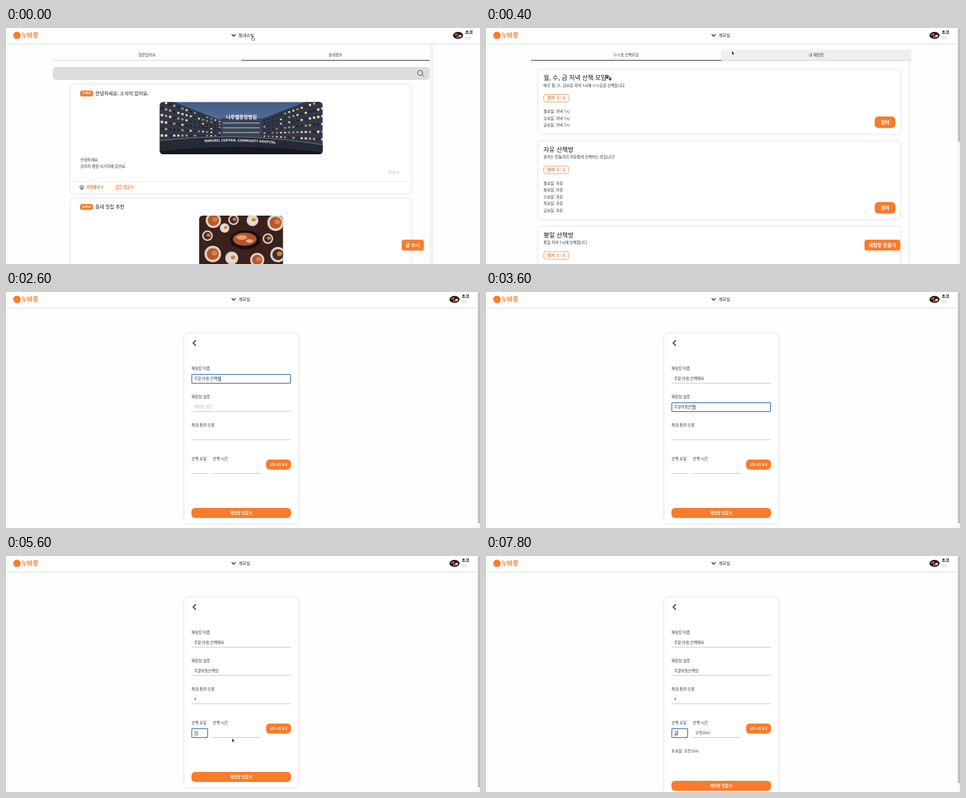
Animation, 800 px wide and 400 px high, one loop 8 s. Source, as an HTML page:

```html
<!DOCTYPE html>
<html lang="ko">
<head>
<meta charset="utf-8">
<style>
html, body { margin: 0; width: 100%; height: 100%; overflow: hidden; background: #fefefe; }
svg { display: block; width: 100vw; height: 100vh; }
text { font-family: "Noto Sans CJK KR", "Noto Sans CJK", "Noto Sans", sans-serif; fill: #333; white-space: pre; }
.m { font-weight: 500; fill: #111; }
.b { font-weight: 700; fill: #111; }
.w { font-weight: 700; fill: #fff; }
.o { font-weight: 700; fill: #f97b2c; }
.g { fill: #aaa; }
.card { fill: #fff; filter: drop-shadow(0 0 2px rgba(0, 0, 0, .16)); }
.bar { fill: #fff; filter: drop-shadow(0 1px 2px rgba(0, 0, 0, .12)); }
.line { fill: none; stroke: #111; stroke-linecap: round; stroke-linejoin: round; }
</style>
</head>
<body>
<svg id="stage" viewBox="0 0 800 400" preserveAspectRatio="none"></svg>
<script>
const ORANGE = '#f97b2c';
const stage = document.getElementById('stage');

// Text is placed by the vertical centre of its line.
const text = (x, cy, size, string, cls = '', anchor = 'start', extra = '') =>
  `<text x="${x}" y="${cy + size * .37}" font-size="${size}" class="${cls}" text-anchor="${anchor}" ${extra}>${string}</text>`;
const mid = (x, cy, size, string, cls) => text(x, cy, size, string, cls, 'middle');
const rect = (x, y, w, h, fill, r = 0, extra = '') =>
  `<rect x="${x}" y="${y}" width="${w}" height="${h}" rx="${r}" fill="${fill}" ${extra}/>`;
const card = (x, y, w, h, id = '') => rect(x, y, w, h, '#fff', 6, `class="card" ${id}`);
const ellipse = (x, y, rx, ry, fill) => `<ellipse cx="${x}" cy="${y}" rx="${rx}" ry="${ry}" fill="${fill}"/>`;
const line = (d, width = 1, color = '#111') =>
  `<path class="line" d="${d}" style="stroke:${color};stroke-width:${width}"/>`;
const button = (x, y, w, h, size, label, r = 5) =>
  rect(x, y, w, h, ORANGE, r) + mid(x + w / 2, y + h / 2, size, label, 'w');
const paw = (x, y, scale, fill) =>
  `<g transform="translate(${x} ${y}) scale(${scale})">` +
  ellipse(0, 2, 2.8, 2.4, fill) + ellipse(-3.5, -.6, 1, 1.5, fill) + ellipse(-1.3, -2.7, 1.1, 1.6, fill) +
  ellipse(1.3, -2.7, 1.1, 1.6, fill) + ellipse(3.5, -.6, 1, 1.5, fill) + '</g>';

function randomFrom(seed) {
  return () => (seed = seed * 16807 % 2147483647) / 2147483647;
}

function header(title, dx) {
  const x = 763 + dx;
  return rect(0, -4, 800, 30, '#fff', 0, 'class="bar"') +
    ellipse(18.5, 12.5, 6.3, 6.3, ORANGE) + text(26, 12.5, 10.3, '누비몽', 'o') +
    line('M381.3 11 L384.2 14 L387.1 11', 1.2) + text(392.5, 12.5, 7, title, 'm') +
    ellipse(x, 12.5, 8.5, 6, '#211b1d') + ellipse(x - 3, 11, 3, 2, '#b95529') +
    ellipse(x + 3.5, 13.5, 2.6, 2, '#d9cec5') + ellipse(x, 15.5, 3, 1.4, '#c6622f') +
    text(x + 12, 7.8, 7, '초코', 'b') + text(x + 12, 17, 5, '안녕', 'g');
}

function wing(x0, x1, top0, top1, bottom0, bottom1, seed) {
  const random = randomFrom(seed);
  let out = `<path fill="#303747" d="M${x0} ${top0} L${x1} ${top1} V${bottom1} L${x0} ${bottom0}Z"/>`;
  for (let col = 0; col < 15; col++) {
    for (let row = 0; row < 6; row++) {
      const u = (col + .3) / 15, v = (row + .5) / 6.5;
      const top = top0 + (top1 - top0) * u, bottom = bottom0 + (bottom1 - bottom0) * u;
      const lit = random();
      const fill = lit > .72 ? '#f3d9a3' : lit > .45 ? '#b7946a' : '#1d2331';
      out += rect(x0 + (x1 - x0) * u, top + (bottom - top) * v, 4.2 - 1.8 * u, 4 - 2 * u, fill);
    }
  }
  return out;
}

function hospital() {
  return '<g clip-path="url(#clipA)">' + rect(259, 125, 276, 90, 'url(#sky)') +
    wing(259, 364, 116, 157, 192, 186, 17) + wing(534, 430, 114, 155, 200, 187, 91) +
    rect(362, 153, 70, 34, '#39435a') +
    [0, 1, 2].map(i => rect(366, 160 + i * 8, 62, 2.2, '#8b8c8e')).join('') +
    '<path fill="#252a35" d="M259 191 Q397 175 535 198 V215 H259Z"/>' +
    '<path fill="none" stroke="#777d88" stroke-width="1" d="M259 191 Q397 175 535 198"/>' +
    '<path id="arc" fill="none" d="M335 193.5 Q398 190 462 197"/>' +
    '<path fill="#151922" d="M259 209 Q397 193 535 211 V215 H259Z"/>' +
    mid(397.5, 151.5, 8, '나루벨중앙병원', 'w') +
    '<text class="w" font-size="5.7"><textPath href="#arc">NARUBEL CENTRAL COMMUNITY HOSPITAL</textPath></text></g>';
}

function food() {
  const plates = [[350, 326, 13], [384, 325, 9], [416, 326, 10], [455, 330, 14], [340, 352, 9],
    [369, 339, 8], [349, 383, 14], [442, 357, 9], [381, 390, 11], [424, 393, 12], [459, 384, 13]];
  return '<g clip-path="url(#clipB)">' + rect(326, 318, 142, 90, '#3b201b') +
    plates.map(([x, y, r], i) => ellipse(x, y, r, r, '#d9d0c8') +
      ellipse(x, y, r * .72, r * .72, ['#b6592d', '#463029', '#e6ddd3'][i % 3]) +
      ellipse(x + r * .2, y - r * .1, r * .35, r * .3, '#d98045')).join('') +
    ellipse(404, 359, 26, 16, '#17110f') + ellipse(403, 358, 20, 11, '#b4562a') +
    ellipse(398, 355, 9, 4, '#e4a067') + ellipse(411, 361, 6, 3, '#e2b48c') + '</g>';
}

const postHead = (cy, title) =>
  rect(125, cy - 5, 22, 10, ORANGE, 3.5) + mid(136, cy, 4, '동네정보', 'w') + text(151, cy, 8, title, 'm');

function news() {
  return rect(715, 26, 6, 374, '#f3f3f3') +
    mid(238, 46, 6.3, '질문있어요') + mid(556, 46, 6.3, '동네정보') +
    rect(79, 54.7, 318, .7, '#bbb') + rect(397, 54.3, 318, 1.2, '#333') +
    rect(79, 66, 636, 22, '#dcdcdc', 6) +
    '<circle cx="699" cy="76" r="4.2" fill="none" stroke="#444"/>' + line('M702 79 L705.3 82.3', 1, '#444') +
    card(109.5, 96.5, 574, 184) + postHead(111, '안녕하세요. 소식이 있어요.') + hospital() +
    text(125.5, 224, 6.4, '안녕하세요.') + text(125.5, 234.7, 6.4, '강아지 병원 사거리에 있어요.') +
    text(664, 245, 6, '15초 전', 'g', 'end') + rect(110, 259.6, 573, .8, '#e6e6e6') +
    paw(128, 270.2, .95, '#888') + text(135.5, 270, 6.3, '추천해요 0', 'o') +
    line('M187 266.5 H194.8 V272.5 H189.2 L187 274.5Z', .9, ORANGE) +
    line('M189.2 268.6 H192.6 M189.2 270.4 H191.8', .6, ORANGE) + text(198, 270, 6.3, '댓글 0', 'o') +
    card(109.5, 289.5, 574, 130) + postHead(303.3, '동네 맛집 추천') + food() +
    rect(668, 359, 37, 18, ORANGE, 4, 'style="filter:drop-shadow(0 0 1.5px #f97b2c88)"') +
    mid(686.5, 368, 8, '글 쓰기', 'w') + header('동네소식', 0);
}

function menu() {
  return rect(0, 26, 800, 374, '#000', 0, 'opacity=".4"') +
    '<path fill="#fff" d="M371 25 H429 V98 Q429 103 424 103 H376 Q371 103 371 98Z"/>' +
    rect(375, 32, 50, 14, '#e2e2e2', 4) + rect(375, 48.3, 50, 14, ORANGE, 4) +
    mid(400, 39, 6.4, '개모임', 'm') + mid(400, 55.3, 6.4, '동네소식', 'w') +
    mid(400, 71, 6.4, '멍그램', 'm') + mid(400, 87, 6.4, '프로필', 'm');
}

function room(y, h, title, about, days) {
  return card(88.5, y, 610.5, h) + text(97, y + 14, 10.4, title, 'm') + text(97, y + 26.7, 6.4, about) +
    rect(97.4, y + 42, 42.4, 13, '#fff', 4, `stroke="${ORANGE}" stroke-width=".8"`) +
    mid(118.6, y + 48.5, 6.6, '참여: 0 / 0', 'o') +
    days.map((day, i) => text(97, y + 71.3 + i * 11.5, 6.4, day)).join('') +
    button(656, y + h - 29, 35, 19.5, 8, '참여', 6);
}

function rooms() {
  const free = ['월', '화', '수', '목', '금'].map(day => day + '요일: 자유');
  const evening = ['월', '수', '금'].map(day => day + '요일: 저녁 7시');
  return rect(711.5, 57, 6, 343, '#f5f5f5') + rect(397, 37, 321, 18, '#efefef') +
    mid(236.5, 46, 6.3, 'ㅁㅁ동 산책모임') + mid(557.5, 46, 6.3, '내 채팅방') +
    rect(76, 54.2, 321, 1.2, '#333') + rect(397, 54.7, 321, .7, '#bbb') +
    room(70.5, 108.5, '월, 수, 금 저녁 산책 모임', '매주 월, 수, 금요일 저녁 7시에 ㅁㅁ공원 산책합니다', evening) +
    paw(204.5, 82.5, .75, '#222') + paw(209.5, 86, .65, '#222') +
    room(192, 132, '자유 산책방', '원하는 분들끼리 자유롭게 산책하는 방입니다!', free) +
    room(337, 132, '평일 산책방', '평일 저녁 7시에 산책합니다', []) +
    rect(639, 359, 60, 18, ORANGE, 4, 'style="filter:drop-shadow(0 0 1.5px #f97b2c88)"') +
    mid(669, 368, 8, '채팅방 만들기', 'w') + header('개모임', -6) +
    rect(795, 0, 5, 400, '#f7f7f7') + rect(796.5, 0, 3.5, 193, '#bebebe', 1.5);
}

// Each field: left, top, width, placeholder, then [time, value] pairs.
const fields = {
  name: { x: 313, y: 139, w: 168, hint: '20자 이하', values: [[0, ''], [1600, 'ㅈ'], [1800, '주말'],
    [2000, '주말 아'], [2200, '주말 아침'], [2400, '주말 아침 산'], [2600, '주말 아침 산책해'], [2800, '주말 아침 산책해요']] },
  desc: { x: 313, y: 187, w: 168, hint: '채팅방 설명', values: [[0, ''], [3000, '주'], [3200, '주말아'],
    [3400, '주말아침사'], [3600, '주말아침산책'], [3800, '주말아침산책바'], [4000, '주말아침산책방']] },
  max: { x: 313, y: 235, w: 168, hint: '', values: [[0, ''], [4600, '4']] },
  day: { x: 313, y: 292, w: 28, hint: '', values: [[0, ''], [5200, 'ㅌ'], [5400, '토'], [7800, '일']] },
  time: { x: 349, y: 292, w: 81.5, hint: '', values: [[0, ''], [6400, '오'], [6600, '오전'],
    [6800, '오전10'], [7000, '오전10시']] }
};
const focusTimes = [[0, ''], [1400, 'name'], [3000, 'desc'], [4200, 'max'], [5000, 'day'], [6000, 'time'], [7400, ''], [7600, 'day']];
const sceneTimes = [[0, 'news'], [200, 'menu'], [400, 'rooms'], [1200, 'form']];
const cursorTimes = [[0, 'hand', 413.5, 13], [200, 'hand', 413.5, 39], [400, 'arrow', 415, 39],
  [600, 'arrow', 520, 170], [800, 'arrow', 640, 332], [1000, 'hand', 668, 366], [1200, 'arrow', 520, 270],
  [1400, 'beam', 347.5, 153], [1600, ''], [5600, 'arrow', 381.5, 309], [5800, 'arrow', 379, 306],
  [6000, 'beam', 375, 300], [6400, ''], [7200, 'hand', 455, 291], [7600, 'beam', 331, 300], [7800, '']];

function form() {
  const inputs = Object.entries(fields).map(([id, f]) =>
    rect(f.x, f.y + 15.1, f.w, .8, '#b5b5b5') +
    rect(f.x + .6, f.y + .6, f.w - 1.2, 15, '#fff', 1.2, `id="ring-${id}" stroke="#2d6cab" stroke-width="1.2"`) +
    text(f.x + 4.5, f.y + 8, 6.4, '', '', 'start', `id="text-${id}"`)).join('');
  return card(301, 70, 192, 322, 'id="panel"') + line('M320 82.3 L315.8 86.5 L320 90.7', 1.5) +
    text(313, 129.8, 6.4, '채팅방 이름') + text(313, 177.8, 6.4, '채팅방 설명') +
    text(313, 225.8, 6.4, '최대 참여 인원') + text(313, 282.8, 6.4, '산책 요일') + text(349, 282.8, 6.4, '산책 시간') +
    inputs + rect(0, 0, .6, 8, '#222', 0, 'id="caret"') + rect(0, 0, 5.9, .6, '#222', 0, 'id="compose"') +
    button(439, 284, 42, 17, 4.8, '산책 시간 추가', 6) +
    `<g id="added">${text(313, 330.5, 6.4, '토요일: 오전10시')}</g>` +
    `<g id="submit">${button(313, 366, 168, 17, 6.4, '채팅방 만들기', 6)}</g>` + header('개모임', -6) +
    rect(795, 0, 5, 400, '#f7f7f7') + rect(796.5, 0, 3.5, 392, '#bebebe', 1.5, 'id="thumb"');
}

const group = (id, content) => `<g id="${id}">${content}</g>`;
stage.innerHTML = `<defs>
  <linearGradient id="sky" x2="0" y2="1"><stop stop-color="#445d87"/><stop offset=".5" stop-color="#5c749b"/><stop offset="1" stop-color="#28303f"/></linearGradient>
  <clipPath id="clipA">${rect(259.5, 125.5, 275, 88.5, '#000', 6)}</clipPath>
  <clipPath id="clipB">${rect(326, 318, 141.5, 100, '#000', 6)}</clipPath></defs>` +
  rect(0, 0, 800, 400, '#fefefe') +
  group('news', news()) + group('menu', menu()) + group('rooms', rooms()) + group('form', form()) +
  group('arrow', '<path d="M0 0V6.3L1.5 5 2.5 7.3 3.5 6.9 2.6 4.7H4.5Z" fill="#111" stroke="#fff" stroke-width=".5"/>') +
  group('hand', '<path d="M1.8 4.4V1Q2.5 .1 3.2 1V3.2L5.6 3.8Q6.3 4.1 6.1 5L5.6 8H2.6L.4 5.1Q.5 4.1 1.8 4.9Z" fill="#fff" stroke="#222" stroke-width=".7"/>') +
  group('beam', line('M-1.4 -3 Q0 -3 0 -2 V2 Q0 3 -1.4 3 M1.4 -3 Q0 -3 0 -2 M0 2 Q0 3 1.4 3', .7, '#444'));

const $ = id => document.getElementById(id);
const show = (id, on) => { $(id).style.display = on ? '' : 'none'; };
const place = (id, x, y) => $(id).setAttribute('transform', `translate(${x} ${y})`);
const latest = (list, t) => list.filter(entry => entry[0] <= t).pop();

function draw(t) {
  const scene = latest(sceneTimes, t)[1];
  show('news', scene === 'news' || scene === 'menu');
  ['menu', 'rooms', 'form'].forEach(id => show(id, scene === id));

  const focus = latest(focusTimes, t)[1];
  show('caret', focus);
  show('compose', false);
  for (const [id, f] of Object.entries(fields)) {
    const value = latest(f.values, t)[1], label = $('text-' + id);
    label.textContent = value || f.hint;
    label.style.fill = value ? '' : '#bbb';
    show('ring-' + id, focus === id);
    if (focus !== id) continue;
    const end = f.x + 4.5 + (value ? label.getComputedTextLength() : 0);
    place('caret', end, f.y + 4);
    show('compose', /[ㄱ-힣]$/.test(value));
    place('compose', end - 5.9, f.y + 11.5);
  }

  const grown = t >= 7400 ? 15 : 0;
  show('added', grown);
  place('submit', 0, grown);
  $('panel').setAttribute('height', 322 + grown);
  $('thumb').setAttribute('height', grown ? 385 : 392);

  const [, kind, x, y] = latest(cursorTimes, t);
  ['arrow', 'hand', 'beam'].forEach(id => show(id, id === kind));
  if (kind) place(kind, x, y);
}

let shown = -1;
function tick() {
  const t = Math.floor(performance.now() % 8000 / 200) * 200;
  if (t !== shown) draw(shown = t);
  requestAnimationFrame(tick);
}
tick();
</script>
</body>
</html>
```
